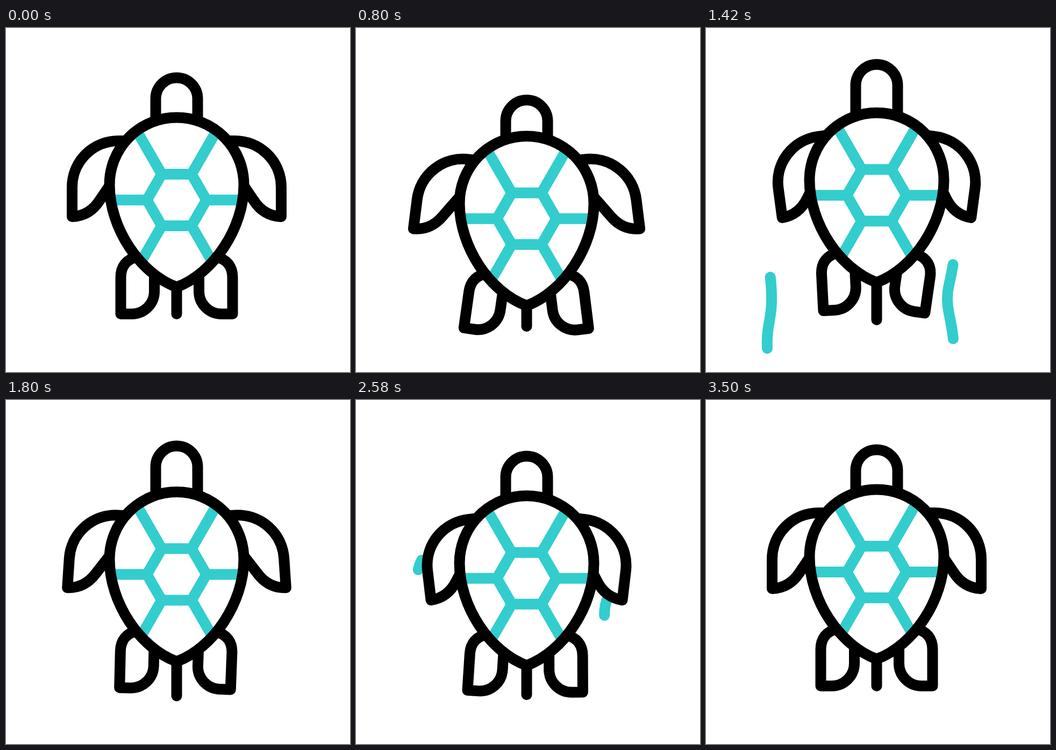
An HTML page for the animation above (3.6 s loop, 640 by 640 pixels).

```html
<!DOCTYPE html>
<html lang="en">
<head>
<meta charset="utf-8">
<title>Swimming turtle</title>
<style>
  html, body { margin: 0; width: 100%; height: 100%; overflow: hidden; background: #fff; }
  svg { display: block; width: 100%; height: 100%; }
  .line, .teal { fill: none; stroke: #000; stroke-width: 20; }
  .line, .wave { stroke-linejoin: round; stroke-linecap: round; }
  .teal { stroke: #33cdcd; }
</style>
</head>
<body>
<svg viewBox="0 0 640 640">
  <defs>
    <path id="arm" d="M222 210H209A86 86 0 0 0 123 296V351C147 350 163 338 174 321L199 284"/>
    <path id="leg" d="M244 426C224 430 213.5 444 213.5 464V532H234A42 42 0 0 0 276 490V455"/>
    <path id="shell" d="M317.5 166.5A125 125 0 0 1 442.5 291.5C442.5 372 386 457 317.5 482C249 457 192.5 372 192.5 291.5A125 125 0 0 1 317.5 166.5Z"/>
  </defs>
  <g class="teal wave">
    <path data-start="860" pathLength="1" d="M109 368C105 392 110 412 115 437S122 475 122 508S112 555 114 596"/>
    <path data-start="912" pathLength="1" d="M463 372C464 415 461 440 452 478S457 540 460 580"/>
    <path data-start="2560" pathLength="1" d="M122 298C108 325 112 365 117 405S125 460 125.5 498S120 535 117 553"/>
    <path data-start="2530" pathLength="1" d="M469 365C457 395 463 415 470 440S481 490 474 538S468 560 468 572"/>
  </g>
  <g id="body">
    <g class="line">
      <use id="armL" href="#arm"/>
      <use id="legL" href="#leg"/>
      <g transform="translate(635 0) scale(-1 1)">
        <use id="armR" href="#arm"/>
        <use id="legR" href="#leg"/>
      </g>
      <path id="head" d="M278.5 192V131.5A39 39 0 0 1 356.5 131.5V192"/>
      <path id="tail"/>
    </g>
    <use href="#shell" fill="#fff"/>
    <path id="plates" class="teal"/>
    <use href="#shell" class="line"/>
  </g>
</svg>
<script>
const LOOP = 3600, START = 200, END = 3460;
const $ = id => document.getElementById(id);
const clamp = x => Math.min(1, Math.max(0, x));
const smooth = p => p * p * (3 - 2 * p);
const easeOut = p => 1 - (1 - p) ** 2;

// Two swim strokes: a part swings through four peaks and comes back to rest.
// "first" is the time of its first peak, "lag" shifts the later ones.
const swing = (first, lag, peaks) => t => {
  const times = [START, first, 1500 + lag, 2250 + lag, 2930 + lag, END];
  const values = [0, ...peaks, 0];
  return times.slice(1).reduce((sum, end, i) => {
    const p = smooth(clamp((t - times[i]) / (end - times[i])));
    return sum + p * (values[i + 1] - values[i]);
  }, 0);
};

const sink = swing(910, 0, [37, -11, 33, -11]);
const neck = swing(850, 50, [-7, 18.5, -8, 13.5]);
const tail = swing(750, 50, [-12, 22, -9, 27]);
const arm = swing(710, -200, [8.2, -8.8, 8.2, -8.8]);
const legL = swing(910, 0, [8.5, -3.5, 10.3, -3.5]);
const legR = swing(910, 0, [7.5, -9, 10.2, -10.5]);

// Regular hexagon with a spoke from each corner to the shell's rim
function drawPlates() {
  const side = 48 / Math.sin(Math.PI / 3);
  const point = (i, r) => {
    const a = i * Math.PI / 3;
    return `${317.5 + r * Math.cos(a)} ${320 + r * Math.sin(a)}`;
  };
  const corners = [0, 1, 2, 3, 4, 5];
  const reach = i => i % 3 === 0 ? 122 : i < 3 ? 135 : 150;
  $('plates').setAttribute('d',
    'M' + corners.map(i => point(i, side)).join('L') + 'Z' +
    corners.map(i => `M${point(i, side)}L${point(i, reach(i))}`).join(''));
}

const move = (id, y) => $(id).setAttribute('transform', `translate(0 ${y})`);
const turn = (id, angle, x, y) => $(id).setAttribute('transform', `rotate(${angle} ${x} ${y})`);

// A wave grows downwards, then its upper end follows
function drawWave(path, t) {
  const age = t - path.dataset.start;
  const low = easeOut(clamp(age / 560));
  const top = clamp((age - 330) / 550);
  path.style.display = low > top ? '' : 'none';
  path.setAttribute('stroke-dasharray', `${low - top} 2`);
  path.setAttribute('stroke-dashoffset', -top);
}

const waves = document.querySelectorAll('.wave path');

function draw(t) {
  move('body', sink(t));
  move('head', -neck(t));
  $('tail').setAttribute('d', `M317.5 482V${532 + tail(t)}`);
  turn('armL', arm(t), 212, 215);
  turn('armR', arm(t), 212, 215);
  turn('legL', legL(t), 270, 436);
  turn('legR', legR(t), 270, 436);
  waves.forEach(w => drawWave(w, t));
}

drawPlates();
const begin = performance.now();
function tick(now) {
  draw(Math.max(0, now - begin) % LOOP);
  requestAnimationFrame(tick);
}
draw(0);
requestAnimationFrame(tick);
</script>
</body>
</html>
```
